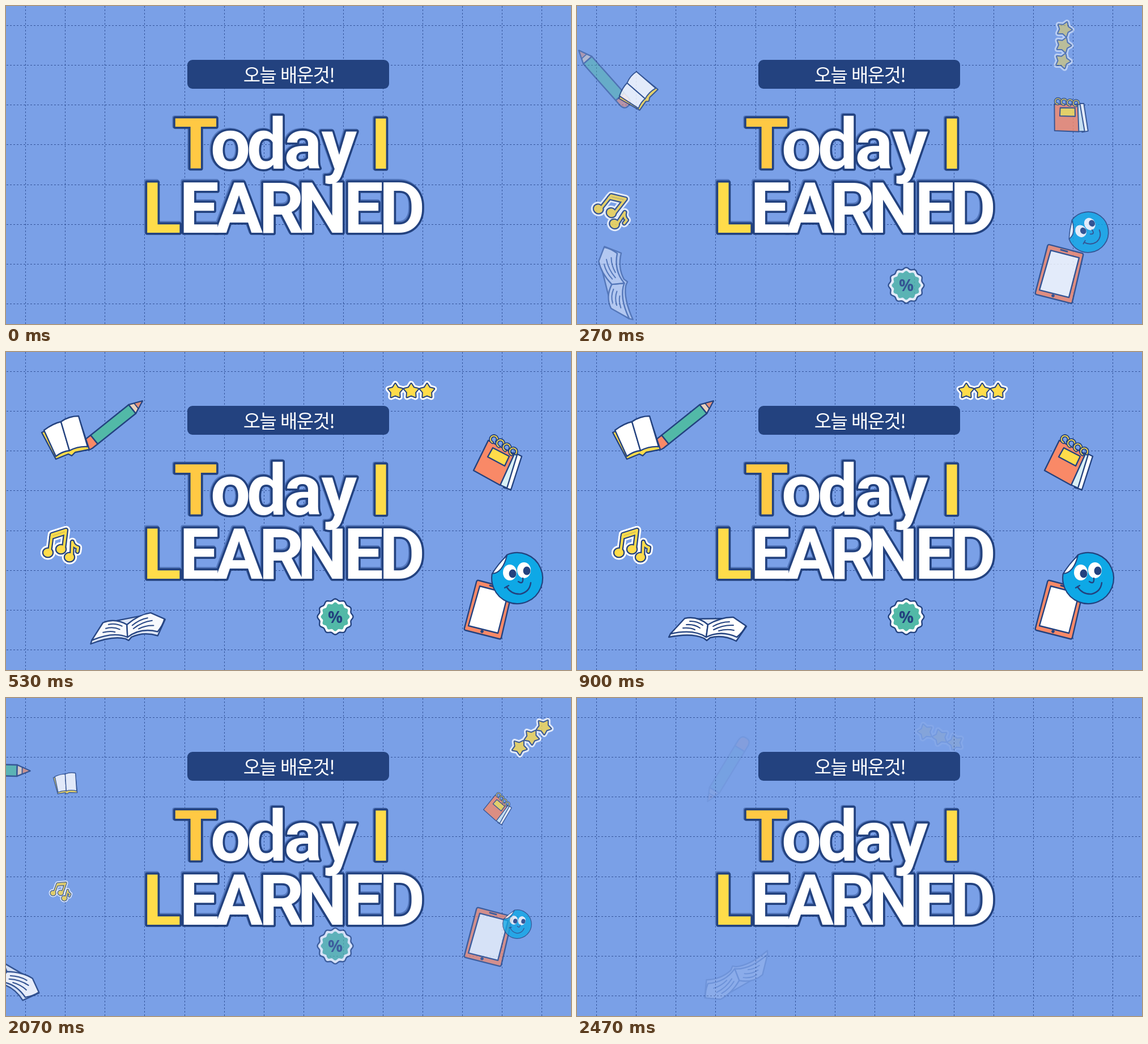
Write an HTML page with a canvas that moves like this. It is 997 by 561 pixels and loops after 2510 ms.

```html
<!DOCTYPE html>
<html lang="ko">
<head>
<meta charset="utf-8">
<title>Today I Learned</title>
<style>
html, body { margin: 0; width: 100%; height: 100%; overflow: hidden; background: #7aa0e7; }
canvas { display: block; }
</style>
</head>
<body>
<canvas id="stage" width="997" height="561" role="img" aria-label="오늘 배운것! Today I LEARNED"></canvas>
<script>
const W = 997, H = 561, LOOP = 2510;
const NAVY = '#23427f', BLUE = '#7aa0e7', YELLOW = '#ffdc4a', ORANGE = '#f98967',
      TEAL = '#52b9a7', WHITE = '#ffffff';
const out = document.getElementById('stage').getContext('2d');
const layer = document.createElement('canvas');
layer.width = W;
layer.height = H;
const c = layer.getContext('2d');
const clamp = v => Math.max(0, Math.min(1, v));

// --- drawing helpers ---
function paint(path, fill, width = 2.4, line = NAVY) {
  if (fill) { c.fillStyle = fill; c.fill(path); }
  if (width) { c.lineWidth = width; c.strokeStyle = line; c.stroke(path); }
}
const shape = (d, fill, width) => paint(new Path2D(d), fill, width);
function ellipse(x, y, rx, ry, fill, width) {
  const p = new Path2D();
  p.ellipse(x, y, rx, ry, 0, 0, 7);
  paint(p, fill, width);
}
function radial(x, y, steps, radius) {
  const p = new Path2D();
  for (let i = 0; i < steps; i++) {
    const a = i / steps * Math.PI * 2 - Math.PI / 2, r = radius(i, a);
    p.lineTo(x + r * Math.cos(a), y + r * Math.sin(a));
  }
  p.closePath();
  return p;
}

// --- stickers, drawn at their resting places ---
function pencil() {
  c.translate(190, 127);
  c.rotate(-0.675);
  shape('M-44-10H-56Q-67-9-66 0Q-67 9-56 10H-44Z', ORANGE);
  shape('M-44-10H42V10H-44Z', TEAL);
  shape('M42-10L65 0L42 10Z', '#ead2bd');
  shape('M51-6L65 0L51 6Z', '#e0907a', 1.8);
}

function yellowBook() {
  shape('M63 142L128 114L147 172L122 177L116 183L110 180L88 189Z', YELLOW);
  shape('M67 138Q83 126 97 123L112 174Q100 175 88 184Z', WHITE);
  shape('M97 123Q111 113 128 113L144 167Q127 166 112 174Z', WHITE);
}

function stars() {
  const row = [687, 715, 743].map(x => radial(x, 69, 10, i => i % 2 ? 7.5 : 13));
  row.forEach(p => paint(p, WHITE, 10, WHITE));
  row.forEach(p => paint(p, YELLOW, 4));
  row.forEach(p => paint(p, YELLOW, 0));
}

function notebook() {
  shape('M900 179L910 184L891 243L878 239Z', WHITE);
  shape('M896 178L902 181L884 240L871 234Z', '#d9f0f5');
  shape('M851 156L897 180L872 235L825 209Z', ORANGE);
  shape('M859 169L888 184L880 201L850 185Z', YELLOW);
  for (let i = 0; i < 4; i++) {
    const ring = new Path2D();
    ring.arc(861 + i * 11.3, 154 + i * 7.2, 6.2, 2, 7);
    paint(ring, null, 5.4);
    paint(ring, null, 1.8, YELLOW);
  }
}

function music() {
  const stems = new Path2D('M77 352L81 322L106 314L102 346M80 327L105 319M116 361L117 335Q119 343 127 345L126 352');
  const heads = new Path2D();
  for (const [x, y] of [[74, 354], [97, 348], [112, 362]]) {
    heads.moveTo(x + 6, y);
    heads.ellipse(x, y, 6, 5.2, 0, 0, 7);
  }
  for (const [w, col] of [[14.5, WHITE], [8.5, NAVY], [4, YELLOW]]) {
    paint(stems, null, w, col);
    paint(heads, col, w, col);
  }
}

function tablet() {
  shape('M834 403L891 418Q894 419 893 422L874 504Q873 507 870 506L811 491Q808 490 809 487L830 406Q831 402 834 403Z', ORANGE);
  shape('M836 413L886 426L868 496L816 483Z', WHITE);
  shape('M854 412L865 415', null, 3);
  ellipse(840, 493, 2.4, 2.4, NAVY, 1);
}

function smiley() {
  const body = new Path2D();
  body.arc(902, 399, 45, -1.98, 3.3);
  body.closePath();
  paint(body, '#0ea8e6', 2.2);
  shape('M884 359Q869 373 858 391Q876 390 884 359Z', WHITE, 2);
  ellipse(889, 389, 12, 14, WHITE, 0);
  ellipse(914, 385, 12, 14, WHITE, 0);
  ellipse(894, 391, 6.5, 7.5, NAVY, 0);
  ellipse(919, 386, 6.5, 7.5, NAVY, 0);
  shape('M904 405Q913 411 912 399', null, 2.4);
  shape('M883 414Q892 428 908 427Q924 423 926 407M880 416L887 412', null, 2.4);
}

function badge() {
  const scallop = r => radial(581, 467, 120, (i, a) => r + 1.5 * Math.cos(12 * a));
  paint(scallop(30), WHITE, 2.4);
  paint(scallop(24), TEAL, 0);
  c.fillStyle = NAVY;
  c.font = 'bold 29px "Open Sans", sans-serif';
  c.textAlign = 'center';
  c.fillText('%', 581, 477.5);
}

function openBook() {
  shape('M165 497L162 503Q202 495 224 505L229 509L235 504Q258 498 281 510L299 484L276 470L191 471Z', '#e4ebf8');
  shape('M231 481Q212 465 190 470L165 497Q206 488 228 503Z', WHITE);
  shape('M231 481Q255 467 276 468L298 483Q293 494 282 503Q254 490 228 503Z', WHITE);
  shape('M199 475Q211 474 222 482M193 481Q207 480 217 487M187 487Q200 486 208 490' +
        'M240 484Q254 476 269 476M241 490Q258 481 276 482M250 492Q264 488 277 491', null, 2);
}

// --- motion: entering(t) and leaving(q) give dx, dy, turn, size, alpha ---
const ENTER = 17, LEAVE = 1933.3;
const entered = t => clamp((t - ENTER) / 516);
const left = t => (t - LEAVE) / 600;
const eased = rem => 1 - rem ** 2.4;

function roll(side, delay = 0) {
  return (t, leaving) => {
    if (leaving) {
      const q = Math.max(0, left(t - delay));
      return { dx: side * (308 - 430 * q), turn: -side * Math.PI * q, alpha: 1 - 1.04 * q };
    }
    const p = entered(t - delay), rem = 1 - p;
    return { dx: side * 278 * rem, turn: side * Math.PI * rem, alpha: p };
  };
}
function pop(turn, dx = 0, dy = 0, grow = true) {
  return (t, leaving) => {
    if (leaving) {
      const q = left(t);
      return { turn: q, size: (1 - q) ** 2.3, alpha: 1 - q };
    }
    const rem = 1 - entered(t), seen = eased(rem);
    return { dx: dx * rem, dy: dy * rem, turn: turn * rem, size: grow ? seen : 1, alpha: seen };
  };
}
function rise(from, to) {
  return (t, leaving) => {
    if (leaving) return { dy: -to * left(t), alpha: 1 - 1.35 * left(t) };
    const rem = 1 - entered(t);
    return { dy: from * rem * rem, alpha: eased(rem) };
  };
}

const items = [
  [pencil, 190, 127, roll(-1)],
  [yellowBook, 106, 150, pop(-1.1)],
  [stars, 715, 69, roll(1)],
  [notebook, 868, 194, pop(-0.9)],
  [music, 98, 339, pop(1.05, -62, 36, false)],
  [tablet, 850, 455, rise(68, 149)],
  [smiley, 902, 399, pop(-1)],
  [badge, 581, 467, rise(97, 133)],
  [openBook, 230, 490, roll(-1, 30)]
];

function drawItem([draw, x, y, move], t, leaving) {
  const { dx = 0, dy = 0, turn = 0, size = 1, alpha } = move(t, leaving);
  if (alpha <= 0 || size <= 0) return;
  c.clearRect(0, 0, W, H);
  c.save();
  c.lineJoin = c.lineCap = 'round';
  c.translate(x + dx, y + dy);
  c.rotate(turn);
  c.scale(size, size);
  c.translate(-x, -y);
  draw();
  c.restore();
  out.globalAlpha = clamp(alpha);
  out.drawImage(layer, 0, 0);
  out.globalAlpha = 1;
}

// --- fixed parts ---
function background() {
  out.fillStyle = BLUE;
  out.fillRect(0, 0, W, H);
  out.strokeStyle = '#34549b';
  out.lineWidth = 1;
  out.setLineDash([3, 3]);
  out.beginPath();
  for (let i = 0; i < 14; i++) {
    const p = Math.floor(34.6 + i * 70.1) + 0.5;
    out.moveTo(p, 0);
    out.lineTo(p, H);
    out.moveTo(1, p);
    out.lineTo(W, p);
  }
  out.stroke();
  out.setLineDash([]);
}

const letters = [
  ['Today', 287, [335, 396, 460, 524, 588]],
  ['I', 287, [661.5]],
  ['LEARNED', 399.5, [275, 341, 411, 486, 558, 631, 699]]
].flatMap(([word, y, xs]) => xs.map((x, i) => [word[i], x, y]));
const tint = { T: '#ffc944', I: YELLOW, L: YELLOW };

function heading() {
  out.fillStyle = NAVY;
  out.beginPath();
  out.roundRect(320, 95, 356, 51, 9);
  out.fill();
  out.textAlign = 'center';
  out.fillStyle = WHITE;
  out.font = '500 33px "Noto Sans CJK KR", "Noto Sans CJK", sans-serif';
  out.letterSpacing = '-1.6px';
  out.wordSpacing = '2px';
  out.fillText('오늘 배운것!', 499, 134);
  out.letterSpacing = out.wordSpacing = '0px';

  out.font = 'bold 125px Roboto, sans-serif';
  out.lineJoin = 'round';
  out.strokeStyle = '#5377bd';
  out.lineWidth = 8;
  for (const [ch, x, y] of letters) out.strokeText(ch, x - 1.5, y - 1.5);
  out.strokeStyle = NAVY;
  out.lineWidth = 7.4;
  for (const [ch, x, y] of letters) out.strokeText(ch, x, y);
  for (const [ch, x, y] of letters) {
    out.fillStyle = tint[ch] || WHITE;
    out.fillText(ch, x, y);
  }
}

function render(ms) {
  // the motion steps at 30 pictures per second
  const step = Math.min(74, Math.floor((ms % LOOP + 5) * 0.03));
  const t = step * 100 / 3;
  background();
  for (const item of items) drawItem(item, t, step > 58);
  heading();
}

let begin = null;
function tick(now) {
  if (begin === null) begin = now;
  render(now - begin);
  requestAnimationFrame(tick);
}
requestAnimationFrame(tick);
</script>
</body>
</html>
```
